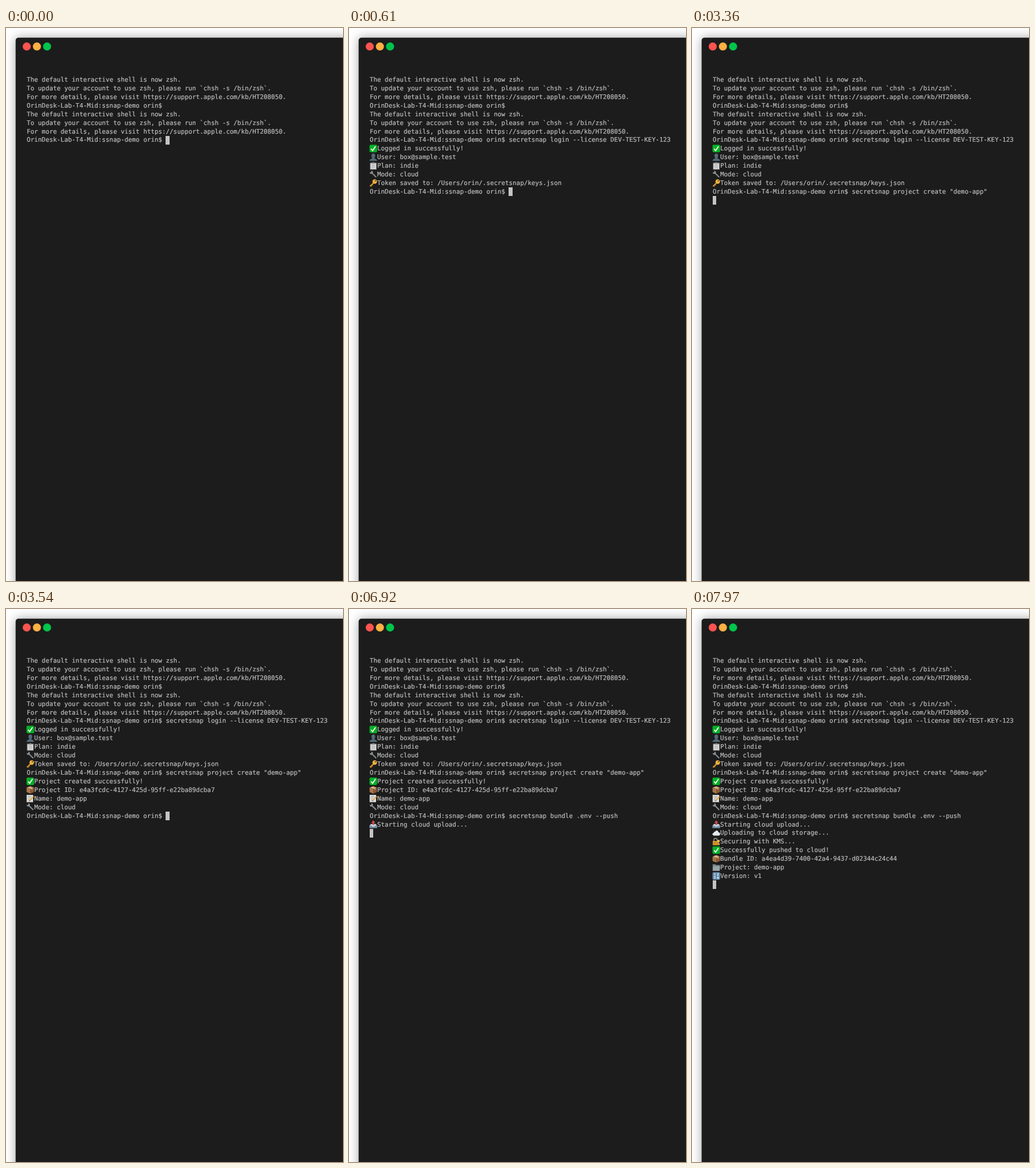
These frames come from a looping animation (585 by 958 pixels, 8 s). An HTML page with a canvas:

```html
<!DOCTYPE html>
<html lang="en">
<head>
<meta charset="utf-8">
<title>Terminal session</title>
<style>
  html, body { margin: 0; width: 100%; height: 100%; overflow: hidden; background: #fff; }
  canvas { position: absolute; left: 0; top: 0; }
  pre {
    position: absolute; left: 35.5px; top: 82.5px; margin: 0;
    font: 10.85px/14.92px "DejaVu Sans Mono", monospace;
    font-variant-ligatures: none;
    text-rendering: geometricPrecision;
    color: #bcbcbc;
    -webkit-text-stroke: .22px #bcbcbc;
    /* an imperceptible turn keeps baselines from snapping to whole pixels */
    transform: rotate(.002deg);
    transform-origin: 0 0;
  }
</style>
</head>
<body>
<canvas id="stage" width="585" height="958"></canvas>
<pre id="text"></pre>
<script>
const LOOP = 8000;
const CELL = { x: 35.5, y: 82.2, w: 6.532, h: 14.92 };
const ctx = document.getElementById('stage').getContext('2d');
const textBox = document.getElementById('text');

const PROMPT = 'OrinDesk-Lab-T4-Mid:ssnap-demo orin$ ';
const NOTICE = `The default interactive shell is now zsh.
To update your account to use zsh, please run \`chsh -s /bin/zsh\`.
For more details, please visit https://support.apple.com/kb/HT208050.
`;

// Terminal output by time; {name} stands for a two-column icon.
const OUTPUT = [
  [0, NOTICE + PROMPT + '\n' + NOTICE + PROMPT],
  [500, 'secretsnap login --license DEV-TEST-KEY-123\n'],
  [610, `{check}Logged in successfully!
{user}User: box@sample.test
{clipboard}Plan: indie
{wrench}Mode: cloud
{key}Token saved to: /Users/orin/.secretsnap/keys.json
` + PROMPT],
  [2610, 'secretsnap project create "demo-app"'],
  [3360, '\n'],
  [3540, `{check}Project created successfully!
{box}Project ID: e4a3fcdc-4127-425d-95ff-e22ba89dcba7
{memo}Name: demo-app
{wrench}Mode: cloud
` + PROMPT],
  [5540, 'secretsnap bundle .env --push'],
  [6120, '\n'],
  [6920, '{outbox}Starting cloud upload...\n'],
  [6970, '{cloud}Uploading to cloud storage...\n'],
  [7620, '{lock}Securing with KMS...\n'],
  [7970, `{check}Successfully pushed to cloud!
{box}Bundle ID: a4ea4d39-7400-42a4-9437-d02344c24c44
{folder}Project: demo-app
{digits}Version: v1
`],
];

// Layers of [colour, path, line width]; layers without a width are filled.
const TILE = 'M2.5 .7H11.5Q13.6 .7 13.6 2.8V11.6Q13.6 13.7 11.5 13.7H2.5Q.4 13.7 .4 11.6V2.8Q.4 .7 2.5 .7Z';
const ICONS = {
  check: [
    ['#06b025', TILE],
    ['#fff', 'M3.2 7.6L5.8 10.8L10.8 3.4', 1.7],
  ],
  user: [
    ['#526a78', 'M7 .8C9.6 .8 10.4 2.8 10.2 4.8C10 6.8 9 8 8.8 8.8C9.2 10 13.4 9.8 13.6 13.7H.4C.6 9.8 4.8 10 5.2 8.8C5 8 4 6.8 3.8 4.8C3.6 2.8 4.4 .8 7 .8Z'],
  ],
  clipboard: [
    ['#80796f', 'M1.2 1.8H12.8V13.8H1.2Z'],
    ['#d8dadb', 'M2.1 2.9H11.9V13.1H2.1Z'],
    ['#8d9295', 'M4.3 1.6H5.8Q7 -.2 8.2 1.6H9.7V3.8H4.3Z'],
    ['#9a9da0', 'M4 6H10M4 8.2H10M4 10.4H10', .8],
  ],
  wrench: [
    ['#8d9699', 'M4.2 4.2L12 12', 2.1],
    ['#8d9699', 'M3.4 .8L3.7 2.8L2.8 3.7L.8 3.4C.6 5.6 2.6 6.8 4.4 6.2L6.2 4.4C6.8 2.6 5.6 .6 3.4 .8Z'],
    ['#555d60', 'M5.5 6.5L11.5 12.5', .6],
  ],
  key: [
    ['#d99a2b', 'M8.2 6.2L1.2 13', 2],
    ['#d99a2b', 'M2.7 11.8L4.2 13.2M4.8 9.8L6.2 11.2', 1.3],
    ['#f0b23f', 'M9.5 .6A4 4 0 1 1 9.4 .6Z'],
    ['#3b3020', 'M10.6 2.1A1.1 1.1 0 1 1 10.5 2.1Z'],
  ],
  box: [
    ['#a8754a', 'M.5 3.5L7 5.8V13.8L.5 11Z'],
    ['#8a5a36', 'M13.5 3.5L7 5.8V13.8L13.5 11Z'],
    ['#c6976a', 'M.5 3.5L7 .8L13.5 3.5L7 5.8Z'],
    ['#e0c7a4', 'M3.5 2.4L9.8 4.7V7', 1.2],
  ],
  memo: [
    ['#dcdddd', 'M.6 1H11.8V13.6H.6Z'],
    ['#92979a', 'M2.6 3.6H9M2.6 5.8H8M2.6 8H6M2.6 10.2H5', .7],
    ['#e3a52f', 'M12.3 4.2L6.4 10.4', 2],
    ['#d06a62', 'M13.2 3.2L12.4 4.1', 2],
    ['#4b4238', 'M5 12L5.6 9.8L7.1 11.2Z'],
  ],
  outbox: [
    ['#7895ab', 'M2.5 6.5H11.5L13.7 9.5V13.6H.3V9.5Z'],
    ['#d5dde2', 'M2.8 7.3H11.2L12.3 9.5H9.5L8.8 11H5.2L4.5 9.5H1.7Z'],
    ['#d84b46', 'M7 .5L10.6 4.4H8.4V8.4H5.6V4.4H3.4Z'],
  ],
  cloud: [
    ['#e8ecee', 'M3.2 11.8C-.5 11.8 -.4 7.2 2.8 7.1C2.6 4.8 4.8 4.4 5.4 5C6.2 1.9 10.4 2.5 10.5 6C14.4 5.8 14.6 11.8 10.9 11.8Z'],
    ['#bac5cc', 'M2.6 11.3H11.4', .9],
  ],
  lock: [
    ['#9b9d9d', 'M2.8 7V4.2C2.8 .7 8.4 .7 8.4 4.2V7', 1.5],
    ['#d99a2b', 'M.7 6.3H10.4V13.6H.7Z'],
    ['#a86f20', 'M.7 9H10.4M.7 11.2H10.4', .6],
    ['#f0bd55', 'M11 4.2A2.1 2.1 0 1 1 10.9 4.2Z'],
    ['#f0bd55', 'M11 8V13.4M11 11H12.8M11 12.8H12.8', 1.1],
  ],
  folder: [
    ['#78868a', 'M.6 1.8H5.2L6.4 3.1H13.2V13H.6Z'],
    ['#98a4a7', 'M2.2 5H13.7L12.5 13.2H.6Z'],
  ],
  digits: [
    ['#648eae', TILE],
    ['#f0f4f6', 'M3.4 3.2L4.5 2.6V6.2M8.6 3.1Q10.8 1.8 10.8 3.6L8.6 6.1H11', 1],
    ['#f0f4f6', 'M3 8.2H5.2L4 9.7Q6 10 5 11.4Q4 12.3 2.9 11.5M10.4 12.1V8.2L8.4 10.9H11.3', 1],
  ],
};
for (const layers of Object.values(ICONS))
  for (const layer of layers) layer[1] = new Path2D(layer[1]);

function drawWindow() {
  ctx.fillStyle = '#fff';
  ctx.fillRect(0, 0, 585, 958);
  ctx.save();
  ctx.shadowColor = 'rgba(0, 0, 0, .36)';
  ctx.shadowBlur = 18;
  ctx.fillStyle = '#1c1c1c';
  ctx.beginPath();
  ctx.roundRect(16.7, 16.7, 640, 1020, 5);
  ctx.fill();
  ctx.restore();
  ['#fd544f', '#fdb044', '#00c44c'].forEach((color, i) => {
    ctx.fillStyle = color;
    ctx.beginPath();
    ctx.arc(36 + i * 17.65, 32.1, 7, 0, Math.PI * 2);
    ctx.fill();
  });
}

function drawIcon(name, row) {
  ctx.save();
  ctx.translate(CELL.x - .3, CELL.y + row * CELL.h + .1);
  for (const [color, path, width] of ICONS[name]) {
    ctx.fillStyle = ctx.strokeStyle = color;
    ctx.lineWidth = width || 1;
    if (width) ctx.stroke(path);
    else ctx.fill(path);
  }
  ctx.restore();
}

function drawCursor(row, column) {
  const left = Math.round(CELL.x + column * CELL.w);
  const right = Math.round(CELL.x + (column + 1) * CELL.w);
  const top = Math.round(CELL.y + row * CELL.h);
  const bottom = Math.round(CELL.y + (row + 1) * CELL.h);
  ctx.fillStyle = '#c4c4c4';
  ctx.fillRect(left, top, right - left, bottom - top);
}

function drawScreen(count) {
  const rows = OUTPUT.slice(0, count).map(part => part[1]).join('').split('\n');
  drawWindow();
  const plain = rows.map((line, row) => line.replace(/^\{(\w+)\}/, (_, name) => {
    drawIcon(name, row);
    return '  ';
  }));
  const last = plain.length - 1;
  drawCursor(last, plain[last].length);
  textBox.textContent = plain.join('\n');
}

let shown = 0;
function tick() {
  const time = performance.now() % LOOP;
  const count = OUTPUT.filter(([start]) => start <= time).length;
  if (count !== shown) drawScreen(shown = count);
  requestAnimationFrame(tick);
}
tick();
</script>
</body>
</html>
```
